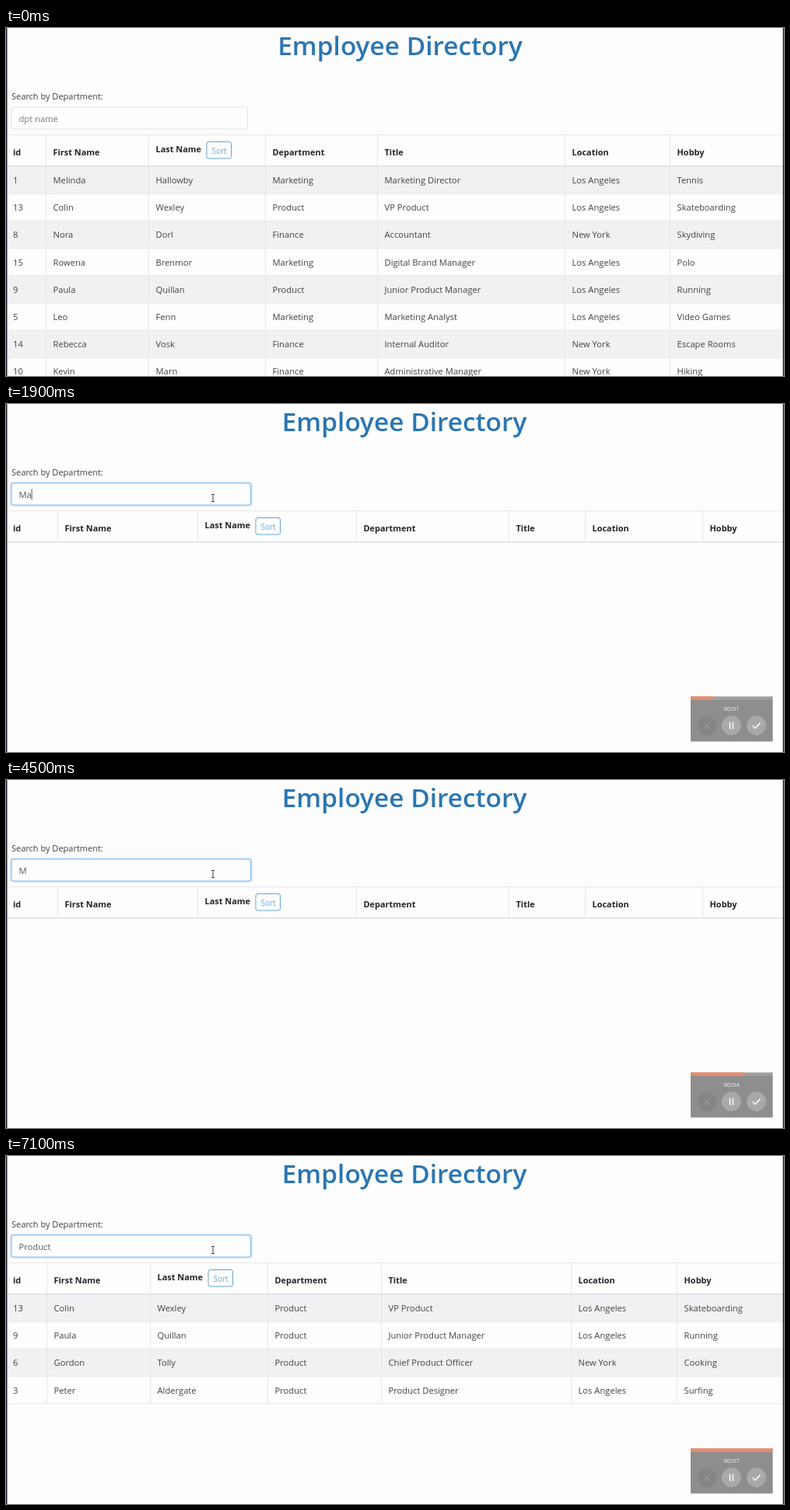
Animation, 1000 px wide and 448 px high, one loop 7200 ms. Source, as an HTML page:

```html
<!DOCTYPE html>
<html lang="en">
<head>
<meta charset="utf-8">
<title>Employee Directory</title>
<style>
html, body { margin: 0; width: 100%; height: 100%; overflow: hidden; background: #fdfdfd; }
svg { display: block; width: 100%; height: 100%; }
text { font: 11.2px "Open Sans", "Noto Sans", sans-serif; fill: #404347; white-space: pre; }
.title { font-size: 33.4px; font-weight: 600; fill: #2b76b1; text-anchor: middle; }
.label { font-size: 11px; }
.head { font-size: 10.95px; font-weight: 700; fill: #212529; }
.sort { font-size: 10px; fill: #6ba9d0; }
.btn { fill: #fefefe; stroke: #62a5cf; }
.line { stroke: #e4e6ea; }
.rule { stroke: #dcdfe3; stroke-width: 1.5; }
.clock { font-size: 8px; fill: #f4f4f4; text-anchor: middle; }
</style>
</head>
<body>
<svg id="stage" viewBox="0 0 1000 448" preserveAspectRatio="none"></svg>
<script>
const LOOP = 7200, STEP = 100;
const ROW_TOP = 178, ROW_H = 35.2;
const stage = document.getElementById('stage');

function add(parent, tag, attrs, text) {
  const el = document.createElementNS('http://www.w3.org/2000/svg', tag);
  for (const key in attrs) el.setAttribute(key, attrs[key]);
  if (text !== undefined) el.textContent = text;
  parent.appendChild(el);
  return el;
}
const rect = (p, x, y, width, height, attrs) => add(p, 'rect', { x, y, width, height, ...attrs });
const label = (p, x, y, cls, text) => add(p, 'text', { x, y, class: cls }, text);
const line = (p, x1, y1, x2, y2, cls) => add(p, 'line', { x1, y1, x2, y2, class: cls });
const show = (el, on) => el.setAttribute('visibility', on ? 'visible' : 'hidden');

const heads = ['id', 'First Name', 'Last Name', 'Department', 'Title', 'Location', 'Hobby'];
const LA = 'Los Angeles', NY = 'New York';
const staff = [
  [1, 'Melinda', 'Hallowby', 'Marketing', 'Marketing Director', LA, 'Tennis'],
  [13, 'Colin', 'Wexley', 'Product', 'VP Product', LA, 'Skateboarding'],
  [8, 'Nora', 'Dorl', 'Finance', 'Accountant', NY, 'Skydiving'],
  [15, 'Rowena', 'Brenmor', 'Marketing', 'Digital Brand Manager', LA, 'Polo'],
  [9, 'Paula', 'Quillan', 'Product', 'Junior Product Manager', LA, 'Running'],
  [5, 'Leo', 'Fenn', 'Marketing', 'Marketing Analyst', LA, 'Video Games'],
  [14, 'Rebecca', 'Vosk', 'Finance', 'Internal Auditor', NY, 'Escape Rooms'],
  [10, 'Kevin', 'Marn', 'Finance', 'Administrative Manager', NY, 'Hiking'],
  [6, 'Gordon', 'Tolly', 'Product', 'Chief Product Officer', NY, 'Cooking'],
  [3, 'Peter', 'Aldergate', 'Product', 'Product Designer', LA, 'Surfing']
];
const inDept = name => staff.filter(row => row[3] === name);

function makeView(rows, edges, center, inputRight) {
  const g = add(stage, 'g', {});
  label(g, center, 35, 'title', 'Employee Directory');
  const bands = rows.map((row, i) =>
    rect(g, 2, ROW_TOP + i * ROW_H, 997, ROW_H, { fill: i % 2 ? '#fdfdfd' : '#f1f1f3' }));
  const bottom = ROW_TOP + rows.length * ROW_H;
  line(g, 2, 137.5, 999, 137.5, 'line');
  edges.forEach(x => line(g, x + .5, 137, x + .5, bottom, 'line'));
  rows.forEach((row, i) => {
    const y = ROW_TOP + (i + 1) * ROW_H;
    line(g, 2, y, 999, y, 'line');
  });
  line(g, 2, 177.7, 999, 177.7, 'rule');
  const xs = [9, ...edges.map(x => x + 9.5)];
  heads.forEach((h, c) => label(g, xs[c], c === 2 ? 160 : 164, 'head', h));
  rect(g, xs[2] + 65.5, 146.5, 31.5, 21.5, { class: 'btn', rx: 2.5 });
  label(g, xs[2] + 72, 161.5, 'sort', 'Sort');
  rows.forEach((row, i) => row.forEach((cell, c) =>
    label(g, xs[c], 200 + i * ROW_H, 'cell', cell)));
  return { g, bands, inputRight };
}

const views = {
  all: makeView(staff.slice(0, 8), [51, 183, 333, 477, 718, 853], 506.5, 311),
  none: makeView([], [66, 246, 450, 646, 744, 895], 512, 315),
  Marketing: makeView(inDept('Marketing'), [54, 191, 345, 494, 731, 871], 512, 315),
  Product: makeView(inDept('Product'), [52, 185, 336, 482, 726, 862], 512, 315)
};

label(stage, 7, 91.5, 'label', 'Search by Department:');
const glow = rect(stage, 5.5, 100.5, 0, 31, { rx: 4, fill: '#bfdcfb' });
const box = rect(stage, 7, 102, 0, 28, { rx: 3, fill: '#fefefe' });
const field = label(stage, 16.5, 120.5, 'field', '');
const caret = rect(stage, 0, 109.5, 1, 14, { fill: '#555' });

rect(stage, 0, 0, 1.5, 448, { fill: '#20212b' });
rect(stage, 998.6, 0, 1.4, 448, { fill: '#20212b' });

// Recorder panel
const panel = add(stage, 'g', {});
rect(panel, 880, 376.5, 105.5, 58, { fill: 'rgba(51,51,51,.55)' });
rect(panel, 880, 376.5, 105.5, 4.5, { fill: 'rgba(255,255,255,.15)' });
const bar = rect(panel, 880, 376.5, 0, 4.5, { fill: '#ea8b6b' });
const clock = label(panel, 932.5, 394.5, 'clock', '');
[901, 932.5, 964.5].forEach((cx, i) => add(panel, 'circle', {
  cx, cy: 414, r: 12.5, fill: i ? 'rgba(255,255,255,.24)' : 'rgba(70,70,70,.12)'
}));
const icon = (d, stroke, width) =>
  add(panel, 'path', { d, stroke, 'stroke-width': width, fill: 'none' });
icon('M897 410l8 8m0-8l-8 8', '#a5a5a5', 1);
icon('M930.5 409.5v9m4-9v9', '#fff', 1.5);
icon('M959.5 414l3.5 3.5 6.5-7', '#fff', 1.5);

const arrow = add(stage, 'path', {
  d: 'M0 0V11.5L2.7 9 4.5 13 6.3 12.2 4.6 8.4H8.2Z',
  fill: '#fff', stroke: '#222', 'stroke-width': 1
});
const beam = add(stage, 'path', {
  d: 'M-2-4.5H2M0-4.5V4.5M-2 4.5H2', fill: 'none', stroke: '#444', 'stroke-width': 1
});

// Pointer path: time, x, y
const path = [[100, 440, 372], [300, 363, 211], [500, 330, 180], [900, 276, 126], [1100, 266, 121]];
function pointer(t) {
  const i = path.findIndex(p => p[0] > t);
  if (i < 0) return path[path.length - 1].slice(1);
  if (i === 0) return path[0].slice(1);
  const [a, b] = [path[i - 1], path[i]], k = (t - a[0]) / (b[0] - a[0]);
  return [a[1] + (b[1] - a[1]) * k, a[2] + (b[2] - a[2]) * k];
}

// Field edits: time, word, letters kept
const FOCUS = 1200;
const edits = [[0, '', 0], [FOCUS, '', 0]];
const keys = (word, times) => times.forEach(([t, n]) => edits.push([t, word, n]));
keys('Marketing', [
  [1600, 1], [1800, 2], [2000, 3], [2200, 4], [2400, 5], [2500, 6], [2700, 7], [2800, 8], [3100, 9],
  [3400, 8], [3500, 7], [3600, 5], [3700, 4], [3800, 2], [3900, 1], [4700, 0]
]);
keys('Product', [[5000, 1], [5300, 2], [5500, 3], [5700, 4], [5900, 5], [6100, 6], [6300, 7]]);

function render(t) {
  const [since, word, n] = edits.filter(e => e[0] <= t).pop();
  const value = word.slice(0, n);
  const name = value === '' ? 'all' : views[value] ? value : 'none';
  const view = views[name];
  for (const key in views) show(views[key].g, key === name);
  views.all.bands[5].setAttribute('fill', t >= 100 && t < 400 ? '#ebebeb' : '#fdfdfd');

  const focused = t >= FOCUS;
  show(glow, focused);
  glow.setAttribute('width', view.inputRight - 4);
  box.setAttribute('width', view.inputRight - 7.5);
  box.setAttribute('stroke', focused ? '#85bcf5' : '#dde1e5');
  field.textContent = value || 'dpt name';
  field.style.fill = value ? '#555a60' : '#777d84';
  show(caret, focused && (t - since) % 1060 < 530);
  caret.setAttribute('x', 16.3 + (value ? field.getComputedTextLength() : 0));

  const active = t >= 100;
  show(panel, active);
  bar.setAttribute('width', Math.min(105.5, t * .0152));
  clock.textContent = '00:0' + Math.floor(t / 1000);

  const [x, y] = pointer(t);
  const overField = y > 102 && y < 130 && x < view.inputRight;
  show(arrow, active && !overField);
  show(beam, active && overField);
  for (const el of [arrow, beam]) el.setAttribute('transform', `translate(${x} ${y})`);
}

const start = performance.now();
function tick() {
  const t = (performance.now() - start) % LOOP;
  render(Math.floor(t / STEP) * STEP);
  requestAnimationFrame(tick);
}
render(0);
tick();
</script>
</body>
</html>
```
